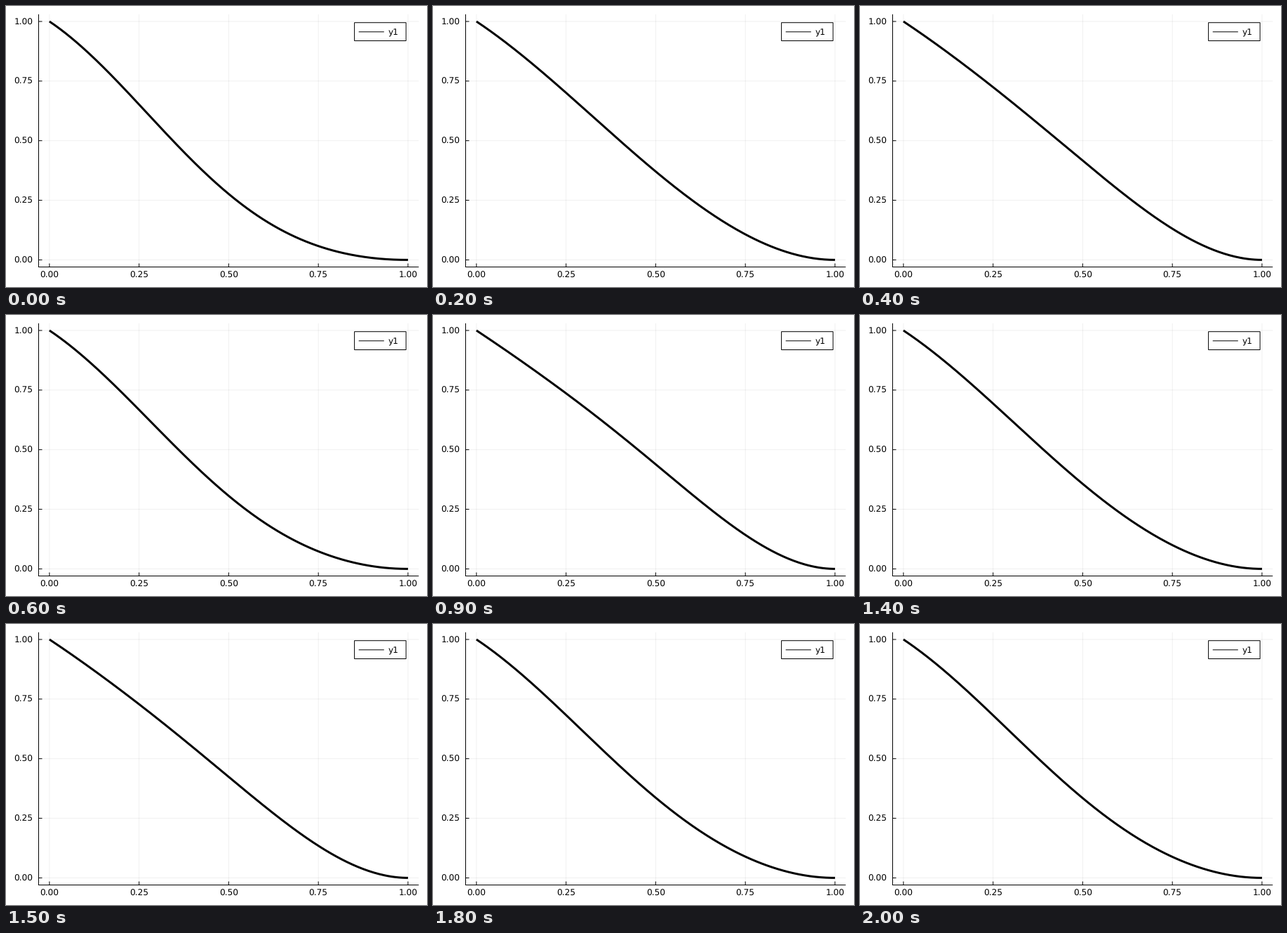
These frames come from a looping animation (600 px wide and 400 px high, 2100 ms). A matplotlib script:

```python
import numpy as np
import matplotlib.pyplot as plt
from matplotlib.animation import FuncAnimation
from matplotlib.patches import Rectangle

W, H, DPI = 600, 400, 100
FRAMES, STEP_MS = 21, 100
PX = 72 / DPI  # points per pixel

LEFT, RIGHT, TOP, BOTTOM = 46.5, 588.2, 11.8, 371.5
TICKS = np.linspace(0, 1, 5)
FONT = dict(family="DejaVu Sans", size=12.1 * PX, color="black")

plt.rcParams["text.hinting"] = "none"
fig = plt.figure(figsize=(W / DPI, H / DPI), dpi=DPI, facecolor="white")
ax = fig.add_axes([0, 0, 1, 1])
ax.set(xlim=(0, W), ylim=(H, 0))
ax.axis("off")


def to_x(u):
    return 61.9 + 511 * u


def to_y(v):
    return 361.4 - 339.4 * v


def line(xs, ys, width=1.0, **kw):
    return ax.plot(xs, ys, lw=width * PX, color="black", snap=False,
                   solid_capstyle="butt", **kw)[0]


def sway(n):
    """Mid-span offset: a steady swing plus a short starting transient."""
    swing = -0.0725 * np.cos(np.radians(56.8) * n)
    return swing - 0.037 * np.exp(-((n - 1.3) / 2.2) ** 2)


def draw_axes():
    for t in TICKS:
        x, y = to_x(t), to_y(t)
        line([x, x], [TOP, BOTTOM], alpha=0.06)
        line([LEFT, RIGHT], [y, y], alpha=0.06)
        line([x, x], [BOTTOM, BOTTOM - 5])
        line([LEFT, LEFT + 5], [y, y])
        ax.text(x, 387, f"{t:.2f}", ha="center", va="baseline", **FONT)
        ax.text(38.7, y + 4.4, f"{t:.2f}", ha="right", va="baseline", **FONT)
    line([LEFT, LEFT], [TOP, BOTTOM + 0.5])
    line([LEFT - 0.5, RIGHT], [BOTTOM, BOTTOM])


def draw_legend():
    ax.add_patch(Rectangle((496.6, 23.7), 73.5, 25.8, fc="white", ec="black",
                           lw=PX, snap=False, zorder=4))
    line([502.7, 538.8], [36.8, 36.8], zorder=5)
    ax.text(544.2, 41.2, "y1", va="baseline", zorder=5, **FONT)


draw_axes()
draw_legend()

u = np.linspace(0, 1, 201)
rest = (1 - u) ** 2 * (1 + u)
bump = np.abs(np.sin(np.pi * u)) ** 1.88
curve = line(to_x(u), to_y(rest), width=3, zorder=3)


def update(n):
    curve.set_ydata(to_y(rest + sway(n) * bump))
    return curve,


anim = FuncAnimation(fig, update, frames=FRAMES, interval=STEP_MS,
                     repeat=True, repeat_delay=0)
plt.show()
```
